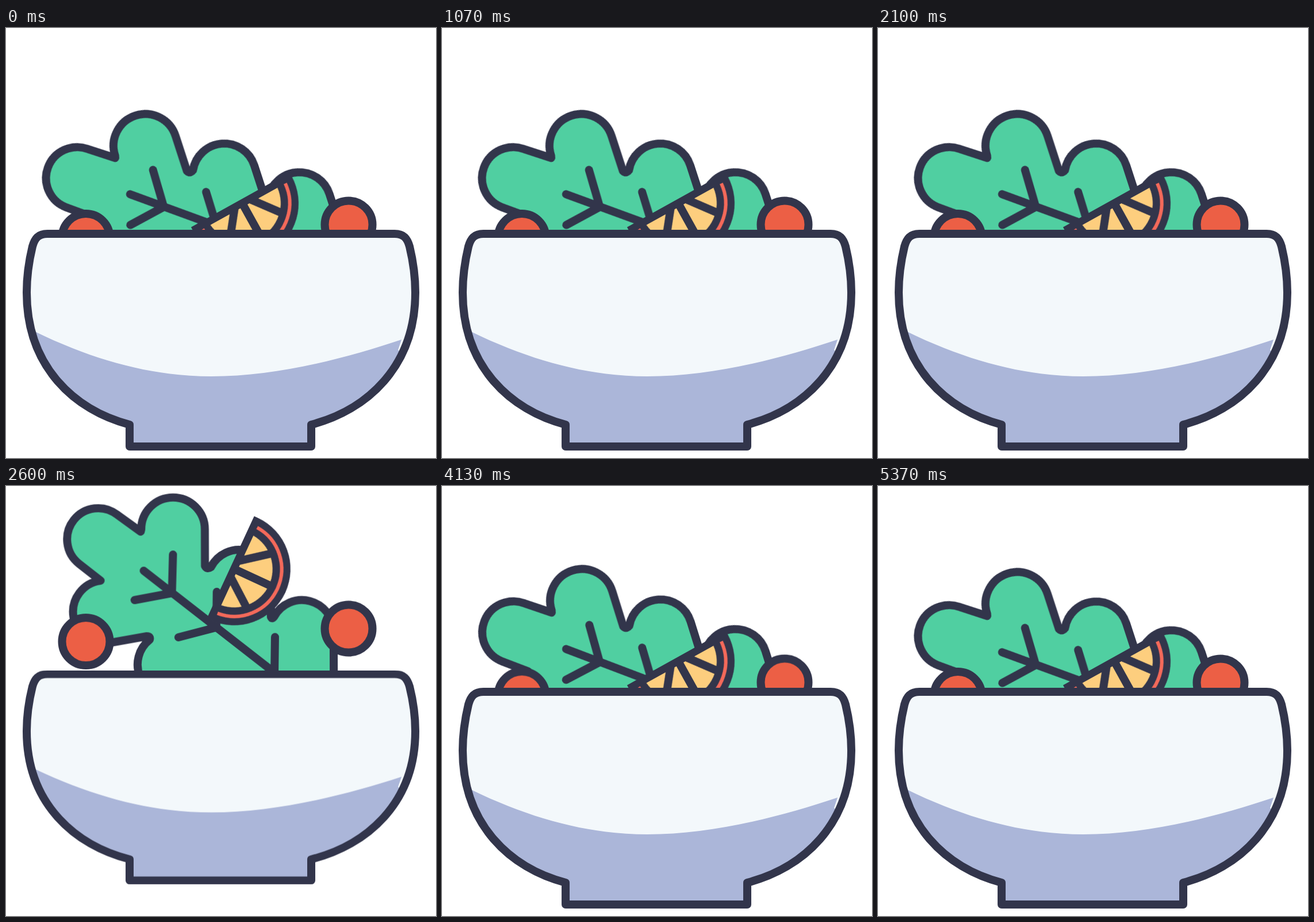
Write an HTML page that moves like this. It is 748 px wide and 748 px high and loops after 5.41 s.

```html
<!DOCTYPE html>
<html lang="en">
<head>
<meta charset="utf-8">
<title>Salad bowl</title>
<style>
  html, body { margin: 0; width: 100%; height: 100%; overflow: hidden; background: #fff; }
  svg { display: block; width: 100vw; height: 100vh; }

  .line { stroke: #32354b; stroke-width: 14; stroke-linecap: round; stroke-linejoin: round; }
  .bare { fill: none; }
  .green { fill: #50cfa1; }
  .red { fill: #ec5f45; }
  .dark { fill: #32354b; }

  .leaf, .tomatoes, .lemon, .bowl {
    animation: 1082ms cubic-bezier(.33, 0, 0, 1) infinite;
  }
  .leaf { transform-origin: 680px 294px; animation-name: leaf; }
  .tomatoes { animation-name: tomatoes; }
  .lemon { transform-origin: 0 0; animation-name: lemon; }
  .bowl { transform-origin: 374px 728px; animation-name: bowl; }

  @keyframes leaf {
    0%, 1.85%, 95.7%, 100% { transform: rotate(-18deg); }
    48%, 49.4% { transform: rotate(0deg); }
  }
  @keyframes tomatoes {
    0%, 1%, 86.4%, 100% { transform: translateY(0); }
    42.5%, 43.9% { transform: translateY(-94px); }
  }
  @keyframes lemon {
    0%, 1%, 73.3%, 100% { transform: translate(411px, 305px) rotate(-29deg); }
    36.3% { transform: translate(396px, 134px) rotate(-67.5deg); }
  }
  @keyframes bowl {
    0% { transform: translateY(0) scaleY(1); animation-timing-function: ease-in; }
    5% { transform: translateY(-9px) scaleY(1.0135); animation-timing-function: cubic-bezier(.15, .5, .4, 1); }
    33% { transform: translateY(-46px) scaleY(.98); animation-timing-function: ease-in; }
    41.2% { transform: translateY(-41px) scaleY(.968); animation-timing-function: linear; }
    49% { transform: translateY(-17px) scaleY(.965); animation-timing-function: ease-out; }
    55% { transform: translateY(0) scaleY(.985); animation-timing-function: ease-out; }
    64%, 100% { transform: translateY(0) scaleY(1); }
  }
</style>
</head>
<body>
<svg viewBox="0 0 748 748">
  <defs>
    <path id="shell" d="M72 358C56 358 50 366 46 380C40 405 36 432 36 460C36 590 120 665 215 690V728H531V690C627 665 712 590 712 460C712 432 708 405 702 380C698 366 692 358 676 358Z"/>
    <clipPath id="inside"><use href="#shell"/></clipPath>
  </defs>

  <g class="leaf line">
    <path class="green" d="M235 78L236 74A55.3 55.3 0 0 1 346.6 74V138Q350 145 357 140A55 55 0 0 1 461 165V227Q463 232 467 226A55 55 0 0 1 570 253V380L290 364A55 55 0 0 1 250 266Q252 260 245 260L182 271A54.7 54.7 0 1 1 165 163L127.5 133.4A54 54 0 0 1 194.6 48.6Z"/>
    <path class="bare" d="M240 146L490 342M291 118L289 185L224 197M367 183L366 245L300 262M468 262L467 324L402 338"/>
  </g>

  <g class="tomatoes line red">
    <circle cx="139" cy="364.5" r="41.5"/>
    <circle cx="596" cy="342" r="41.5"/>
  </g>

  <g class="lemon">
    <path class="dark" d="M-98 -7H98V0A98 98 0 0 1 -98 0Z"/>
    <path d="M82.2 6A82.4 82.4 0 0 1 -82.2 6" fill="none" stroke="#f4695a" stroke-width="6"/>
    <path d="M66.7 6A67 67 0 0 1 -66.7 6Z" fill="#fdce7e"/>
    <path class="line bare" d="M0 0V70M15 0L52 48M-15 0L-52 48"/>
  </g>

  <g class="bowl">
    <use href="#shell" fill="#f3f8fb"/>
    <path clip-path="url(#inside)" fill="#abb6d9" d="M36 521C145 576 250 606 357 606C470 606 590 575 688 542L682 560L720 600V740H30Z"/>
    <use href="#shell" class="line bare"/>
  </g>
</svg>
</body>
</html>
```
